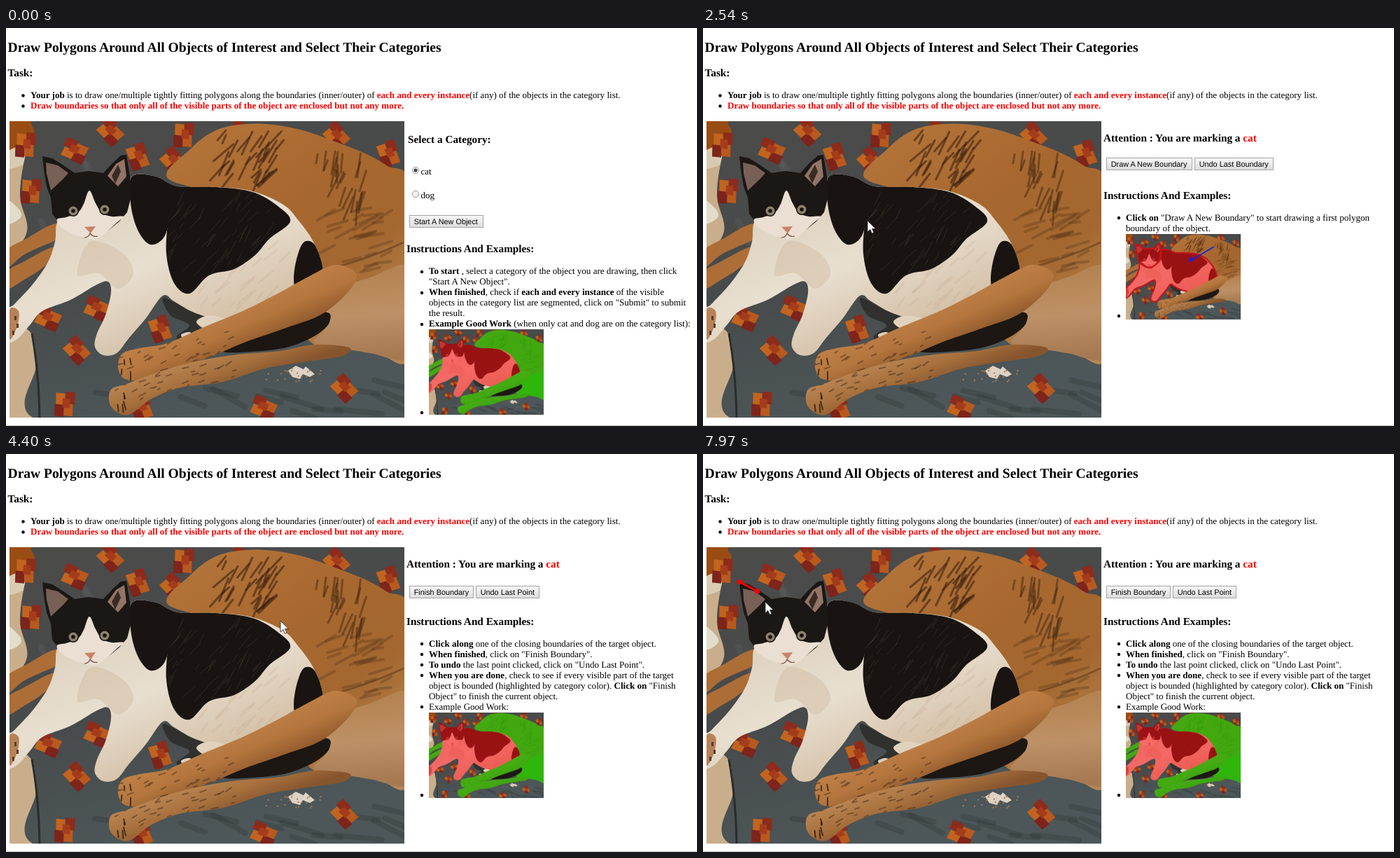
These frames come from a looping animation (987 by 568 pixels, 8000 ms). An HTML page with a canvas:

```html
<!DOCTYPE html>
<html lang="en">
<head>
<meta charset="utf-8">
<title>Polygon annotation</title>
<style>
html, body { margin: 0; width: 100%; height: 100%; overflow: hidden; background: #fff; }
canvas, svg { position: absolute; left: 0; top: 0; display: block; }
text { font-family: "Liberation Serif", "Times New Roman", serif; font-size: 13.05px; white-space: pre; text-rendering: geometricPrecision; }
.h2 { font-size: 19.57px; font-weight: bold; }
.h3 { font-size: 15.27px; font-weight: bold; }
.btn { font-family: "Liberation Sans", Arial, sans-serif; font-size: 10.87px; }
.b { font-weight: bold; }
.r { font-weight: bold; fill: #f00; }
</style>
</head>
<body>
<canvas id="stage" width="987" height="568"></canvas>
<svg id="ui" width="987" height="568" viewBox="0 0 987 568"></svg>
<script>
const LOOP = 8000;
const $ = id => document.getElementById(id);

// ---------- photo ----------
let seed = 7;
const rnd = () => (seed = (seed * 16807) % 2147483647) / 2147483647;

function pairs(s) {
  const n = s.trim().split(/[\s,]+/).map(Number), out = [];
  for (let i = 0; i < n.length; i += 2) out.push([n[i], n[i + 1]]);
  return out;
}

// Closed smooth curve through the given points.
function blob(s) {
  const p = pairs(s), n = p.length, path = new Path2D();
  path.moveTo(...p[0]);
  for (let i = 0; i < n; i++) {
    const a = p[(i + n - 1) % n], b = p[i], c = p[(i + 1) % n], d = p[(i + 2) % n];
    path.bezierCurveTo(b[0] + (c[0] - a[0]) / 6, b[1] + (c[1] - a[1]) / 6,
      c[0] - (d[0] - b[0]) / 6, c[1] - (d[1] - b[1]) / 6, c[0], c[1]);
  }
  path.closePath();
  return path;
}
const poly = s => new Path2D("M" + s + "Z");

const blanket = blob("62,128 40,150 27,185 20,240 30,290 2,340 0,405 36,436 43,480 48,560 320,562 575,562 578,340 575,125 320,124");
const dogBody = blob("230,213 262,174 292,150 325,139 370,137 420,145 470,162 515,180 545,197 575,218 578,340 575,472 530,464 480,458 440,452 400,400 380,300 300,240");
const haunch = blob("452,400 478,372 520,356 575,340 578,410 575,472 520,464 470,455 440,448 458,425");
const farLegs = [blob("0,318 30,300 62,282 78,280 74,300 50,312 25,324 0,343"),
  blob("0,349 28,332 66,313 72,324 50,344 28,358 0,373")];
const cat = blob("76,276 70,305 60,334 38,366 12,394 2,404 0,446 16,444 34,424 52,404 92,388 130,366 146,362 150,378 142,410 130,436 127,455 139,467 158,464 176,442 200,414 224,382 240,390 264,404 290,413 320,418 360,410 420,384 450,362 451,335 438,303 418,275 396,252 352,233 300,227 245,226 214,212 180,212 172,250 150,285 115,298");
const head = poly("52,183 L54,202 58,226 64,242 66,265 78,281 98,294 112,300 130,300 146,289 162,276 173,263 179,240 177,212 172,181 164,182 152,193 139,207 118,204 98,207 82,196 66,186");
const legTop = blob("470,338 430,356 390,378 340,403 280,428 230,450 190,457 166,465 160,484 170,501 198,502 228,490 290,470 340,449 400,428 452,408 490,375 500,350");
const legLow = blob("440,452 390,461 330,466 270,476 215,492 172,508 150,516 148,536 160,549 178,551 208,529 250,513 310,505 370,486 430,476 480,468 490,456");
const dogLegs = [legTop, legLow];

function paintPhoto(catTint, dogTint, outline) {
  const cv = document.createElement("canvas");
  cv.width = 564; cv.height = 423;
  const g = cv.getContext("2d");
  g.translate(-5, -133);
  seed = 7;
  const fill = (p, c) => { g.fillStyle = c; g.fill(p); };
  const tint = (p, c) => { if (c) fill(p, c); };
  const grad = (x0, y0, x1, y1, ...cols) => {
    const l = g.createLinearGradient(x0, y0, x1, y1);
    cols.forEach((c, i) => l.addColorStop(i / (cols.length - 1), c));
    return l;
  };
  // Short random strokes around a point, kept inside a shape.
  const streaks = (clip, x, y, rx, ry, n, ang, len, w, col) => {
    g.save(); g.clip(clip);
    g.strokeStyle = col; g.lineWidth = w; g.lineCap = "round";
    for (let i = 0; i < n; i++) {
      const px = x + (rnd() * 2 - 1) * rx, py = y + (rnd() * 2 - 1) * ry;
      const a = ang + (rnd() - .5) * .5, l = len * (.5 + rnd());
      g.beginPath(); g.moveTo(px, py);
      g.lineTo(px + Math.cos(a) * l, py + Math.sin(a) * l); g.stroke();
    }
    g.restore();
  };

  g.fillStyle = "#c9ae8c"; g.fillRect(5, 133, 564, 423);
  fill(blob("0,128 70,128 50,150 30,178 0,180"), "#9a4d12");
  fill(blob("0,178 26,168 32,184 22,196 0,200"), "#d9cbb2");
  fill(blob("0,246 16,256 22,268 10,278 0,276"), "#e2dccb");
  fill(blanket, grad(150, 133, 260, 555, "#4b4b4a", "#474a4b", "#4d5759"));
  streaks(blanket, 90, 225, 40, 60, 8, 1.2, 60, 9, "rgba(95,102,104,.25)");
  streaks(blanket, 330, 525, 240, 25, 14, .3, 50, 8, "rgba(30,36,38,.2)");

  const spots = pairs("98,173 150,146 190,182 256,152 338,148 473,152 548,178 38,232 130,398 102,458 222,428 86,536 368,540 484,512 195,540 30,166 60,412 240,188");
  spots.forEach(([x, y], i) => {
    g.save(); g.translate(x, y); g.rotate(.25 + (i % 4) * .4); g.transform(1, .15, -.2, .85, 0, 0);
    [["#8e2b1b", -17, -14], ["#b9591d", 0, -11], ["#c2641f", -14, 2], ["#7e241b", 2, 4]].forEach(([c, a, b]) => {
      g.fillStyle = c; g.fillRect(a, b, 17, 15);
    });
    g.fillStyle = "#a43c1c"; g.fillRect(-7, -6, 13, 12);
    g.restore();
  });
  g.strokeStyle = "#2b2c2b"; g.lineWidth = 3;
  g.stroke(new Path2D("M37,436Q47,490 48,558"));

  farLegs.forEach(p => { fill(p, "#ad6d36"); tint(p, dogTint); });
  fill(dogBody, grad(300, 140, 530, 460, "#b27339", "#a8682f", "#a3672f", "#b98655"));
  streaks(dogBody, 352, 178, 45, 32, 34, 2.2, 25, 3, "rgba(60,34,18,.6)");
  streaks(dogBody, 480, 210, 35, 40, 24, 1.8, 24, 3, "rgba(66,38,18,.5)");
  streaks(dogBody, 510, 300, 45, 45, 26, 2.8, 26, 4, "rgba(80,48,22,.3)");
  fill(haunch, grad(500, 350, 510, 470, "#b58352", "#bd9166", "#a67951"));
  g.lineWidth = 3; g.strokeStyle = "rgba(84,50,24,.5)";
  g.stroke(new Path2D("M452,346Q510,333 568,306"));
  tint(dogBody, dogTint); tint(haunch, dogTint);

  // shadow and tail under the cat
  fill(blob("225,385 264,404 300,418 330,425 270,448 252,452 244,440 262,424 235,410"), "#30302e");
  fill(blob("300,448 350,425 450,405 462,420 440,440 400,456 350,462 310,462"), "#1c1713");
  fill(cat, grad(160, 240, 240, 440, "#ded2c0", "#e8dfd0", "#d6c3aa"));
  streaks(cat, 340, 350, 65, 50, 30, 2.3, 20, 3, "rgba(190,166,138,.22)");
  fill(blob("120,305 165,320 182,350 160,372 132,350 102,352"), "rgba(200,176,146,.35)");
  fill(blob("5,402 18,404 16,426 5,444"), "#b78258");
  [[9, 432], [15, 422], [12, 411]].forEach(([x, y]) => { g.fillStyle = "#5a3c28"; g.fillRect(x, y, 3, 6); });
  const patches = ["180,212 214,211 242,226 236,262 226,298 206,309 188,288 178,250",
    "240,226 300,227 352,234 388,254 406,276 376,301 356,324 326,344 290,353 262,379 240,364 229,322 232,272",
    "425,306 440,308 451,334 451,352 434,374 417,379 411,360 415,330"].map(blob);
  g.save(); g.clip(cat);
  patches.forEach(p => fill(p, "#191411"));
  g.restore();
  streaks(patches[1], 310, 280, 75, 55, 55, 2.2, 20, 1, "rgba(105,88,70,.3)");

  fill(head, "#1b1714");
  fill(poly("57,192 L58,208 64,232 82,215 89,207 74,196"), "#786057");
  fill(poly("169,187 L172,212 160,226 145,211 157,194"), "#927466");
  fill(poly("160,195 L151,211 156,222 164,205"), "#3a2b25");
  fill(blob("119,232 111,251 103,263 86,270 73,273 78,284 98,295 118,301 134,299 158,278 168,269 151,269 137,264 128,250"), "#eadfd2");
  [[96, 261], [141, 259]].forEach(([x, y]) => {
    [[8, "#171310"], [6.5, "#8d806a"], [2.8, "#15120f"]].forEach(([r, c]) => {
      g.beginPath(); g.arc(x, y, r, 0, 7); g.fillStyle = c; g.fill();
    });
  });
  fill(poly("112,284 L128,283 121,293"), "#c98268");
  g.lineWidth = 1.2; g.strokeStyle = "#80513f";
  g.stroke(new Path2D("M112,299Q118,299 120,293Q125,299 131,297"));
  fill(blob("272,420 282,412 300,411 324,420 310,430 286,430"), "#e0d2bc");
  fill(blob("250,438 262,434 268,441 258,447"), "#ddd0bd");
  tint(cat, catTint); 
  if (catTint) { g.save(); const out = new Path2D("M0,0H600V600H0Z"); out.addPath(cat); g.clip(out, "evenodd"); tint(head, catTint); g.restore(); }
  if (outline) { g.strokeStyle = outline; g.lineWidth = 7; g.stroke(cat); g.stroke(head); }

  fill(legTop, grad(300, 400, 330, 470, "#c08148", "#b4763e", "#8a5429"));
  fill(legLow, grad(300, 460, 320, 515, "#b98452", "#a7703d", "#87552d"));
  dogLegs.forEach((p, i) => {
    streaks(p, 245, 460 + i * 42, 85, 28, 45, 2.7, 7, 2, "rgba(60,36,20,.45)");
    streaks(p, 168, 484 + i * 42, 12, 14, 5, 1.5, 9, 2, "rgba(50,30,18,.8)");
    tint(p, dogTint);
  });
  fill(poly("403,489 L414,482 425,487 428,483 441,494 434,498 424,494 420,501 409,498"), "#ddd2c4");
  g.fillStyle = "#a87b53";
  for (let i = 0; i < 22; i++) g.fillRect(365 + rnd() * 85, 484 + rnd() * 20, 2, 2);
  return cv;
}

const RED = "rgba(255,15,20,.56)", GREEN = "rgba(42,184,8,.8)";
const photo = paintPhoto();
const both = paintPhoto(RED, GREEN);
const catOnly = paintPhoto(RED, null, "#c3141a");
const thumbs = [[both, 430], [catOnly, 294], [both, 369]];

const ctx = $("stage").getContext("2d");
ctx.imageSmoothingQuality = "high";
function drawStage(panel) {
  ctx.fillStyle = "#fff"; ctx.fillRect(0, 0, 987, 568);
  ctx.fillStyle = "#c4c4c4"; ctx.fillRect(0, 567, 987, 1);
  ctx.drawImage(photo, 5, 133);
  const [img, y] = thumbs[panel];
  ctx.drawImage(img, 604, y, 164, 122);
  if (panel === 1) {
    ctx.strokeStyle = ctx.fillStyle = "#1226d8"; ctx.lineWidth = 1.8;
    ctx.stroke(new Path2D("M730,312L698,331"));
    ctx.fill(poly("692,334 L697,326 701,332"));
  }
}

// ---------- page text ----------
const b = s => `<tspan class="b">${s}</tspan>`;
const r = s => `<tspan class="r">${s}</tspan>`;
const text = (x, y, s, cls = "") => `<text x="${x}" y="${y}" class="${cls}">${s}</text>`;
const dot = (x, y) => `<circle cx="${x}" cy="${y}" r="2.2"/>`;
const lines = (y, list) => list.map((s, i) => text(604, y + i * 15, s)).join("");
const dots = (...ys) => ys.map(y => dot(594, y)).join("");
const button = (x, y, w, s, id = "") =>
  `<rect id="${id}" x="${x + .5}" y="${y + .5}" width="${w - 1}" height="17" fill="url(#face)" stroke="#a3a3a3"/>` +
  text(x + 6.7, y + 12.6, s, "btn");
const radio = (y, on) => `<circle cx="585" cy="${y}" r="4.7" fill="#f1f1f1" stroke="#9a9a9a"/>` +
  (on ? `<circle cx="585" cy="${y}" r="2.6" fill="#444"/>` : "");
const examples = y => text(572, y, "Instructions And Examples:", "h3");
const attention = text(572, 162, "Attention : You are marking a " + r("cat"), "h3");

const panels = [
  text(574, 164, "Select a Category:", "h3") + radio(203, true) + text(592.5, 209, "cat") +
  radio(237, false) + text(592.5, 243, "dog") + button(576, 267, 106, "Start A New Object", "start") +
  examples(320) + dots(348, 378, 423, 549) + lines(351, [
    b("To start") + " , select a category of the object you are drawing, then click",
    '"Start A New Object".',
    b("When finished") + ", check if " + b("each and every instance") + " of the visible",
    'objects in the category list are segmented, click on "Submit" to submit',
    "the result.",
    b("Example Good Work") + " (when only cat and dog are on the category list):"]),
  attention + button(576, 185, 123, "Draw A New Boundary", "draw") + button(702, 185, 113, "Undo Last Boundary") +
  examples(244) + dots(271, 411) + lines(275, [
    b("Click on") + ' "Draw A New Boundary" to start drawing a first polygon',
    "boundary of the object."]),
  attention + button(576, 188, 92, "Finish Boundary") + button(671, 188, 91, "Undo Last Point") +
  examples(244) + dots(271, 286, 301, 316, 361, 487) + lines(275, [
    b("Click along") + " one of the closing boundaries of the target object.",
    b("When finished") + ', click on "Finish Boundary".',
    b("To undo") + ' the last point clicked, click on "Undo Last Point".',
    b("When you are done") + ", check to see if every visible part of the target",
    "object is bounded (highlighted by category color). " + b("Click on") + ' "Finish',
    'Object" to finish the current object.',
    "Example Good Work:"])
];

$("ui").innerHTML = `<defs>
  <linearGradient id="face" x2="0" y2="1"><stop stop-color="#f7f7f7"/><stop offset="1" stop-color="#dcdcdc"/></linearGradient>
  <linearGradient id="down" x2="0" y2="1"><stop stop-color="#e2e2e2"/><stop offset="1" stop-color="#f2f2f2"/></linearGradient></defs>` +
  text(2.5, 34, "Draw Polygons Around All Objects of Interest and Select Their Categories", "h2") +
  text(2.5, 69, "Task:", "h3") + dot(24.5, 96.5) + dot(24.5, 111.5) +
  text(35, 100, b("Your job") + " is to draw one/multiple tightly fitting polygons along the boundaries (inner/outer) of " +
    r("each and every instance") + "(if any) of the objects in the category list.") +
  text(35, 115, r("Draw boundaries so that only all of the visible parts of the object are enclosed but not any more.")) +
  panels.map((p, i) => `<g id="panel${i}">${p}</g>`).join("") +
  `<circle id="pointA" cx="52.5" cy="182.5" r="3.6" fill="#f00"/>
  <g id="edge"><path d="M52.5,182.5L77.5,196" stroke="#f00" stroke-width="3"/><circle cx="77.5" cy="196" r="3.6" fill="#f00"/></g>
  <circle id="glow" r="11.7" fill="#f2ee1c" fill-opacity=".62"/>
  <path id="cursor" d="M0,0V16L3.8,12.6L6.4,18.2L9,17L6.5,11.6H11.3Z" fill="#fff" stroke="#333" stroke-width=".9"/>`;

// ---------- motion ----------
// start, end, number of steps, evenly timed positions
const moves = [
  [300, 920, 9, "850,441 790,385 700,312 645,280 628,271"],
  [1150, 1220, 2, "628,274 628,277"],
  [2000, 2000, 1, "624,289"],
  [2230, 2850, 9, "590,294 410,292 235,275 168,250 145,241"],
  [3000, 3770, 11, "152,240 240,230 400,211 535,196 588,191"],
  [4080, 4640, 8, "587,192 575,198 540,210 470,226 392,238 295,240 215,234 159,225"],
  [4720, 5340, 9, "148,222 105,207 70,192 51,184 48,183"],
  [5490, 5650, 3, "50,183 52,183 53,184"],
  [5940, 6500, 9, "56,186 72,196 86,204 92,206 92,208"],
  [6650, 6800, 3, "87,203 81,199 79,198"],
  [6970, 6970, 1, "78,197"],
  [7120, 7500, 6, "79,199 84,205 88,209"],
  [7670, 7970, 3, "88,211 88,212 89,211"]
].map(([t0, t1, n, s]) => ({ t0, n, step: (t1 - t0) / (n - 1) || 1, pts: pairs(s) }));

function cursorAt(t) {
  const m = moves.filter(v => t >= v.t0).pop();
  if (!m) return null;
  const k = Math.min(m.n - 1, Math.floor((t - m.t0) / m.step + 1e-6));
  const last = m.pts.length - 1, u = m.n > 1 ? k / (m.n - 1) * last : 0;
  const i = Math.min(Math.floor(u), Math.max(last - 1, 0)), f = u - i;
  const p = m.pts[i], q = m.pts[i + 1] || p;
  return [p[0] + (q[0] - p[0]) * f, p[1] + (q[1] - p[1]) * f].map(Math.round);
}

const within = (t, a, z) => t >= a && t < z;
const show = (id, on) => { $(id).style.display = on ? "" : "none"; };
let shown = -1;

function render(t) {
  const panel = t < 2000 ? 0 : t < 4080 ? 1 : 2;
  if (panel !== shown) {
    shown = panel;
    drawStage(panel);
    panels.forEach((_, i) => show("panel" + i, i === panel));
  }
  const pos = cursorAt(t);
  const click = within(t, 1850, 2000) || within(t, 3860, 4080) || within(t, 5570, 5800);
  show("cursor", pos);
  show("glow", click);
  show("pointA", t >= 5800);
  show("edge", t >= 7120);
  if (pos) {
    $("cursor").setAttribute("transform", `translate(${pos})`);
    $("glow").setAttribute("transform", `translate(${pos[0] - .5} ${pos[1] - .5})`);
  }
  const press = (id, on) => $(id).setAttribute("fill", `url(#${on ? "down" : "face"})`);
  press("start", within(t, 1850, 2000));
  press("draw", within(t, 3860, 4080));
}

const begin = performance.now();
function tick() {
  render((performance.now() - begin) % LOOP);
  requestAnimationFrame(tick);
}
tick();
</script>
</body>
</html>
```
